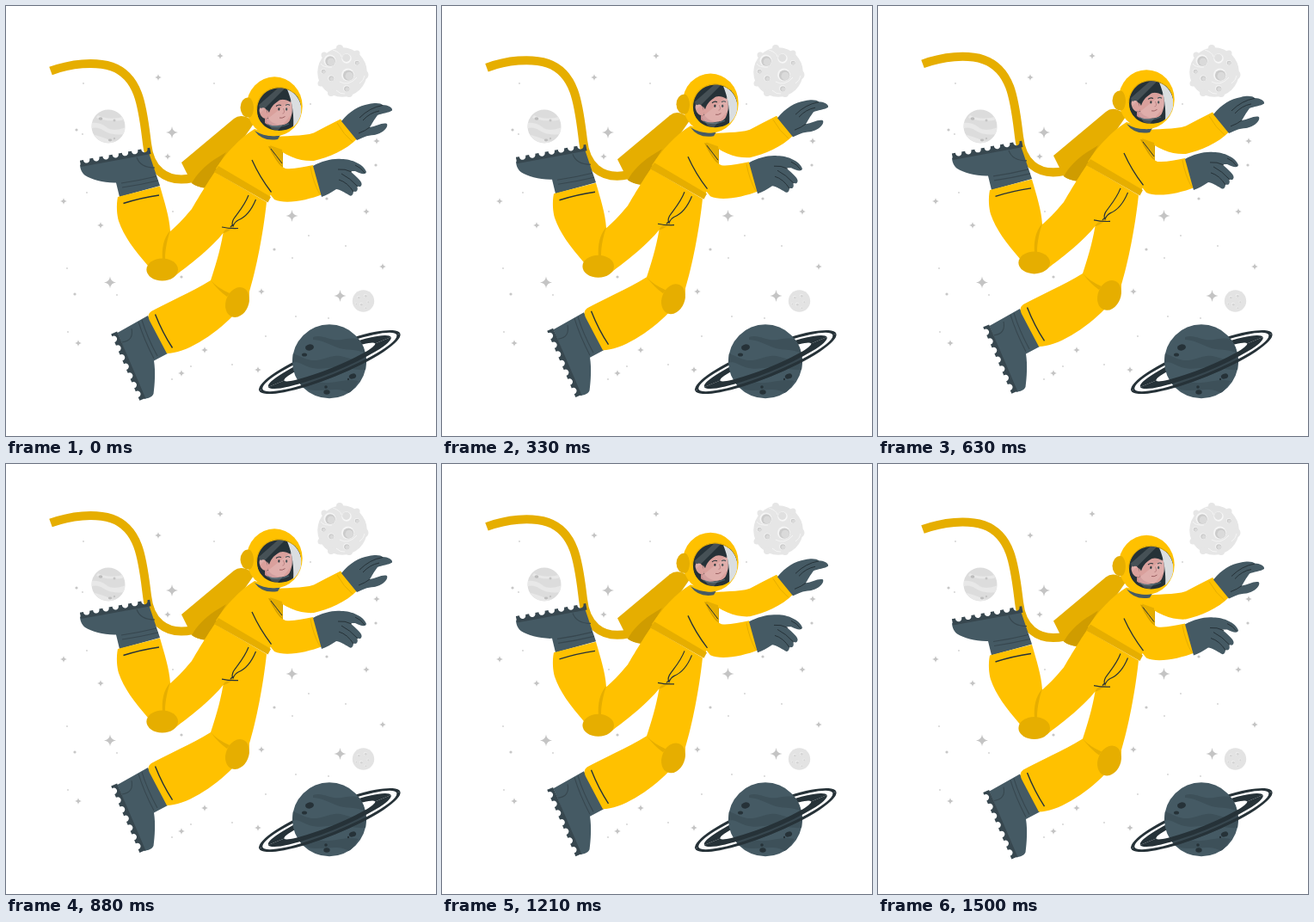
Animation, 500 px wide and 500 px high, one loop 1540 ms. Source, as an HTML page with a canvas:

```html
<!DOCTYPE html>
<html lang="en">
<head>
<meta charset="utf-8">
<title>Floating astronaut</title>
<style>
html, body { margin: 0; width: 100%; height: 100%; overflow: hidden; background: #fff; }
canvas { display: block; width: 500px; height: 500px; }
</style>
</head>
<body>
<canvas id="stage" width="500" height="500"></canvas>
<script>
const ctx = document.getElementById('stage').getContext('2d');
const LOOP = 1540, STEPS = 37, TOP_DELAY = 65, RISE = 10;
const YELLOW = '#ffc100', AMBER = '#e6ae00', OCHRE = '#cf9c00';
const SLATE = '#455a64', STEEL = '#37474f', INK = '#263238';

const fill = (d, color) => { ctx.fillStyle = color; ctx.fill(new Path2D(d)); };
function line(d, color = INK, width = 1.2) {
  ctx.strokeStyle = color;
  ctx.lineWidth = width;
  ctx.stroke(new Path2D(d));
}
function oval(x, y, rx, ry, color, angle = 0) {
  ctx.fillStyle = color;
  ctx.beginPath();
  ctx.ellipse(x, y, rx, ry, angle, 0, Math.PI * 2);
  ctx.fill();
}
const disc = (x, y, r, color) => oval(x, y, r, r, color);
function clipped(x, y, r, draw) {
  ctx.save();
  ctx.beginPath();
  ctx.arc(x, y, r, 0, Math.PI * 2);
  ctx.clip();
  draw();
  ctx.restore();
}

function star(x, y, r) {
  const k = r * 0.1;
  fill(`M${x} ${y - r}Q${x + k} ${y - k} ${x + r} ${y}Q${x + k} ${y + k} ${x} ${y + r}` +
    `Q${x - k} ${y + k} ${x - r} ${y}Q${x - k} ${y - k} ${x} ${y - r}Z`, '#c4c4c4');
}

function drawStars() {
  const small = [[249, 58], [177, 83], [188, 175], [67, 227], [110, 255], [84, 392], [231, 400],
    [204, 427], [293, 423], [297, 332], [419, 239], [438, 303], [431, 157]];
  small.forEach(([x, y]) => star(x, y, 4));
  [[193, 147], [121, 321.5], [332.5, 244], [388.5, 337]].forEach(([x, y]) => star(x, y, 7));
  [[82, 144], [80, 335], [204, 315], [312, 283], [373, 224], [430, 185]]
    .forEach(([x, y]) => disc(x, y, 1.6, '#c7c7c7'));
  [[90, 90], [89, 149], [242, 90], [94, 217], [71, 305], [129, 336], [72, 379], [194, 239],
    [333, 293], [352, 267], [395, 279], [337, 361], [302, 384], [375, 363], [263, 417],
    [193, 434], [215, 419], [354, 114]].forEach(([x, y]) => disc(x, y, 0.9, '#cfcfcf'));
}

function crater(x, y, r) {
  disc(x, y, r, '#f5f5f5');
  disc(x + r * 0.08, y + r * 0.08, r * 0.83, '#cbcbcb');
  disc(x + r * 0.22, y + r * 0.2, r * 0.62, '#dadada');
}

function drawMoons() {
  disc(391, 77, 28.8, '#e6e6e6');
  [[388, 49, 4], [408, 55, 3.5], [416, 80, 5.5], [399, 102, 4], [378, 101, 4], [366, 90, 3.5], [370, 57, 3.5]]
    .forEach(([x, y, r]) => disc(x, y, r, '#e6e6e6'));
  crater(376.5, 63.5, 7);
  crater(397.5, 80, 7.5);
  crater(396, 96, 3.8);
  crater(378, 84, 3.6);
  crater(369, 76, 3);
  crater(408, 66, 3);
  disc(396, 61, 5.7, '#f7f7f7');
  disc(395.7, 60.3, 4.6, '#e0e0e0');
  line('M380 51Q389 54 390 59M366 67Q369 72 379 71M388 88Q398 94 408 83M411 90Q416 87 417 81M384 98Q389 103 394 102', '#f5f5f5', 1);

  disc(119, 140, 19.5, '#dcdcdc');
  clipped(119, 140, 19.5, () => {
    fill('M98 136Q110 135 117 141T140 141L140 149Q123 151 114 145T98 143Z', '#e8e8e8');
    fill('M107 127Q121 134 139 128L139 132Q122 136 105 130Z', '#e8e8e8');
    fill('M99 149Q112 152 120 156T139 153L132 157Q117 163 101 153Z', '#e8e8e8');
    oval(110, 131, 2.4, 1.7, '#bdbdbd');
    disc(126, 133, 1.5, '#c4c4c4');
    oval(121, 156, 2.1, 1.4, '#bdbdbd');
    disc(126, 154, 1.2, '#c4c4c4');
  });

  disc(415.5, 343, 12.7, '#e3e3e3');
  [[410, 339, 2], [418, 337, 2.2], [421, 344, 1.6], [413, 347, 2.2], [418, 351, 1.5], [407, 346, 1.2]]
    .forEach(([x, y, r]) => { disc(x, y, r, '#eee'); disc(x + 0.3, y + 0.3, r * 0.7, '#d5d5d5'); });
}

function ring(a, b, innerA, innerB, color, from, to) {
  const tilt = -0.385;
  ctx.fillStyle = color;
  ctx.beginPath();
  ctx.ellipse(376.3, 414, a, b, tilt, from, to);
  ctx.ellipse(376.3, 414, innerA, innerB, tilt, to, from, true);
  ctx.fill();
}
function rings(from, to) {
  ring(88.5, 17.8, 84, 14.5, INK, from, to);
  ring(77, 12.3, 57, 7.2, INK, from, to);
}

function drawRingedPlanet() {
  const shade = '#3d5059';
  rings(Math.PI, Math.PI * 2);
  disc(376, 413.3, 43, SLATE);
  clipped(376, 413.3, 43, () => {
    fill('M357 385C368 381 377 390 390 388S410 386 419 389L421 405C407 398 396 401 385 397S370 389 357 388Z', shade);
    fill('M331 403C343 407 350 413 361 412S380 404 393 408S411 414 421 409L420 423C408 424 398 421 387 420S363 425 350 419S339 414 331 415Z', shade);
    fill('M339 436C352 434 364 439 376 438S396 433 410 436L400 451C386 441 370 450 351 446Z', shade);
    oval(353, 397, 5, 3.6, INK, -0.2);
    oval(347, 405.5, 3, 2, INK);
    oval(403, 430.5, 4.2, 3, INK, -0.3);
    oval(373, 449, 3.7, 2.8, INK);
    disc(372, 443, 1.8, INK);
    disc(398, 434, 1.2, INK);
    ring(88.5, 17.8, 77, 12, STEEL, 0, Math.PI);
  });
  rings(0, Math.PI);
}

// Toothed sole running from one point to the other, teeth on the left-hand side.
function sole(x0, y0, x1, y1, count, depth) {
  const dx = (x1 - x0) / count, dy = (y1 - y0) / count, len = Math.hypot(dx, dy);
  const nx = dy / len * depth, ny = -dx / len * depth;
  const at = (i, h) => `${x0 + dx * i + nx * h} ${y0 + dy * i + ny * h}`;
  let d = `M${at(0, -1.2)}L${at(0, 1)}`;
  for (let i = 0; i < count; i++) {
    d += `L${at(i + 0.36, 1)}C${at(i + 0.32, -0.7)} ${at(i + 1.04, -0.7)} ${at(i + 1, 1)}`;
  }
  fill(d + `L${at(count + 0.25, 1)}L${at(count + 0.25, -1.2)}Z`, STEEL);
}

function drawBoots() {
  fill('M87 185L166 170.5L179 209L132 222L128 205.5C114 206 100 202 92 197C87 193 86 187 86 184Z', SLATE);
  sole(86.5, 183, 165, 168.6, 7.5 | 0, 3.4);
  line('M152 176Q156 188 173 188M134 206Q155 203 175 198M135 211Q156 208 177 203', STEEL, 1.1);
  fill('M129.5 380L165 360L188 404L172 412.5C174 425 173 440 171.5 451C169 456 164 456 161 457Z', SLATE);
  sole(158.5, 457.5, 126.5, 382.8, 7, 3.4);
  line('M135 391Q149 389 146 375M154 367Q160 387 172 410M158 365Q164 385 176 407', STEEL, 1.1);
}

function drawLegs() {
  fill('M243 193C236 202 222 226 216 236C206 248 197 257 191 262C190 245 184 227 179 209.5L130 222' +
    'C128 232 129 243 131 250C137 268 149 283 165 302C170 316 190 322 200 311C215 300 240 280 252.5 264' +
    'C249 285 243 304 238 319C215 333 187 345 169 355C165 358 165 361 167 366L187 404' +
    'C208 404 241 384 264 360C281 349 283 342 283 332C291 306 299 265 303 228Z', YELLOW);
  fill('M191 261C183 270 181 282 182 295L185 294C185 282 188 270 191 261Z', AMBER);
  fill('M238 319Q247 331 257 338L260 334Q246 328 238 319Z', AMBER);
  fill('M252.5 264C254 260 258 257 267 256C261 260 256 264 252.5 264Z', AMBER);
  oval(181.7, 306.5, 18.3, 13, AMBER);
  oval(269, 344.5, 13.2, 18, AMBER, 0.38);
  line('M136.5 229.5Q157 223 178 220M173.5 358.5Q182 380 193.5 397.5', INK, 1.4);
  line('M282 220C277 233 269 241 264.5 248Q262 253 264 256Q266 251 270 249C280 245 286 236 290.5 225M264 254L261 257M251 257Q260 259 270 258.5');
}

function drawTorso() {
  fill('M204 182L265 131Q271 126 279 129L290 134L258 180L232 212Q222 210 216 206Z', AMBER);
  fill('M216 206C222 195 231 186 243 178L256 170L232 211Q222 211 216 206Z', OCHRE);
  fill('M289 143C272 153 255 172 244 189L305 225L322 190L322 164L316 151Z', YELLOW);
  fill('M305 163L322 167L322 189Q314 181 305 163Z', OCHRE);
}

function drawArms() {
  fill('M307 153C325 150 345 152 358 147.5Q372 140 389 131.5L408.5 154C395 168 375 176 358 180C342 181 326 175 307 160Z', YELLOW);
  fill('M299 156C308 174 316 185 325 189C335 190 345 187 357 185L368 219C350 226 325 231 312 225C303 214 294 200 286 180Z', YELLOW);
  fill('M307 162L321 167L322 187Q313 178 307 162Z', AMBER);
  line('M308 166Q315 175 321 183', INK, 1);
  line('M385 136Q393 150 403 158M354 187Q357 205 365 219', AMBER, 1);
  line('M286 179Q295 199 308.5 216.5', INK, 1.3);

  fill('M390 134C400 122 410 116 422 114C430 112 436 113 438 115C444 115 450 118 449 121.5C446 124 436 125 432 127' +
    'C428 132 425 138 423 141C430 140 438 135 443 137C445 142 436 149 428 150C420 150 413 154 408 156Z', SLATE);
  line('M411 130Q423 118 438 115.5M415 133Q423 124 434 122M410 148Q418 145 423 141', INK, 1);

  fill('M357 186C368 180 380 177 390 178C402 178 416 184 419 193C418 197 412 195 406 192C403 192 401 192 400 192' +
    'C408 199 416 205 413 209C412 211 409 210 408 209C410 214 408 217 404 215.5C404 219 402 222 399 220' +
    'C394 217 388 213 384 213C378 217 373 220 367 222Z', SLATE);
  line('M386 190Q394 189 402 193M390 195Q400 200 409 210M387 202Q397 205 404 216M406 185Q413 188 417 194', INK, 1);
}

function drawFace() {
  disc(316, 121, 30, YELLOW);
  fill('M292 121C291 105 301 94 316 94C331 94 341 103 343 114L337 136C330 147 309 148 299 138C294 133 292 128 292 121Z', INK);
  fill('M301 131L311 130L320 138Q308 142 301 136Z', '#c98d8d');
  fill('M304 119C312 115 315 110 318 108L331 109C334 117 333 127 330 133C327 139 318 140 311 136C305 133 302 126 304 119Z', '#d9a09c');
  fill('M303 121C298 114 293 118 295 124C297 131 302 132 305 130Z', '#d9a09c');
  fill('M296 119C294 105 303 95 317 95C328 96 333 104 331 112C325 108 319 108 316 111C311 114 308 118 306 124Q302 116 296 119Z', INK);
  line('M314 116.5Q317 114 320 115.5M325 115.5Q328 113.5 330 115.5', INK, 1.1);
  oval(317.4, 120, 1.1, 1.7, INK);
  oval(326.2, 120, 1.1, 1.7, INK);
  line('M322.5 119Q325 125 321.5 125', '#a55f61', 0.8);
  line('M318 130Q321 131 324.5 128.5', '#8b4548', 1);
  line('M304 138Q316 143 329 137', SLATE, 1.5);
  fill('M294 115L318 94L324 96L296 124Z', 'rgba(255,255,255,.15)');
  fill('M302 133L337 105L342 114L316 145L309 143Z', 'rgba(255,255,255,.15)');
  fill('M327 97C346 104 349 130 334 141C335 126 333 111 327 97Z', '#dadee0');
}

function drawHead() {
  fill('M289 145Q304 154 319 150L316 155Q298 158 289 145Z', SLATE);
  oval(312.2, 116.8, 32.5, 34.5, YELLOW);
  clipped(317.5, 120.5, 26, drawFace);
  line('M291.5 121A26 26 0 0 1 334 100.5', AMBER, 1.2);
  oval(281.5, 118, 9, 11.5, AMBER);
  fill('M283 106C292 108 294 127 284 130C289 125 290 112 283 106Z', YELLOW);
}

function drawAstronaut() {
  line('M52 75.5C75 67 103 64 123 70.5C156 82 159 120 164 160C167 188 184 207 217 200', AMBER, 10);
  drawBoots();
  drawTorso();
  drawLegs();
  fill('M247 186L308 222L304.5 228.5L242 193Z', AMBER);
  drawArms();
  drawHead();
}

// Linear rise and fall, sampled in even steps.
function lift(t) {
  const p = ((t + TOP_DELAY) % LOOP) / LOOP;
  return RISE * (1 - Math.abs(1 - 2 * p));
}

function render(now) {
  const step = LOOP / STEPS;
  const t = Math.floor((now % LOOP) / step) * step;
  ctx.fillStyle = '#fff';
  ctx.fillRect(0, 0, 500, 500);
  drawStars();
  drawMoons();
  drawRingedPlanet();
  ctx.save();
  ctx.translate(0, lift(0) - lift(t));
  drawAstronaut();
  ctx.restore();
}

const start = performance.now();
function tick() {
  render(performance.now() - start);
  requestAnimationFrame(tick);
}
tick();
</script>
</body>
</html>
```
